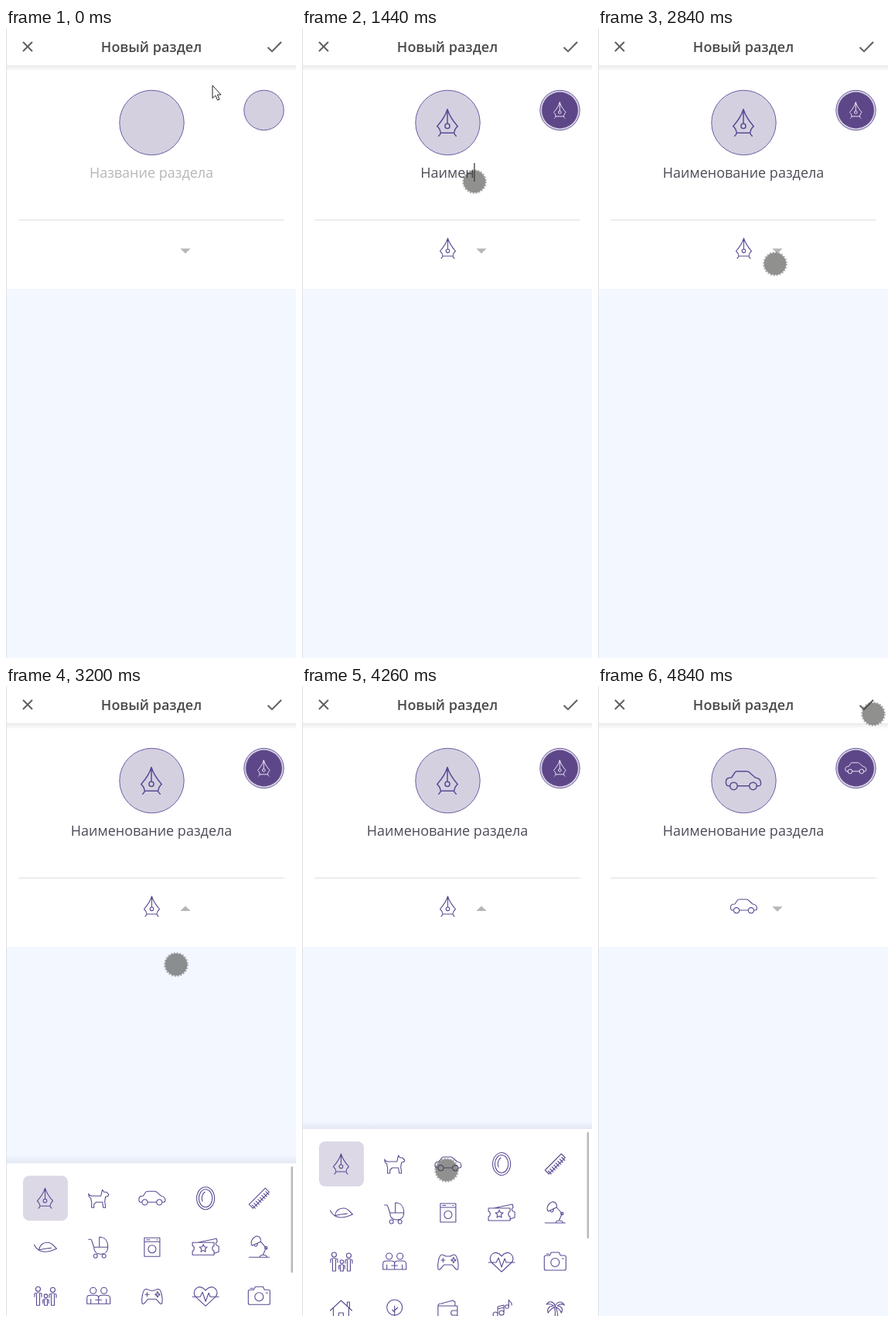
An HTML page that plays this animation: 375x812 px, repeating every 5.06 s.

```html
<!DOCTYPE html>
<html lang="ru">
<head>
<meta charset="utf-8">
<title>Новый раздел</title>
<style>
html, body { margin: 0; width: 100%; height: 100%; overflow: hidden; background: #fff; }
svg { display: block; width: 375px; height: 812px; }
text { font: 18px "Open Sans", "Noto Sans", sans-serif; text-anchor: middle; }
.icon { fill: none; stroke: #5b4a93; stroke-width: 1.1; stroke-linejoin: round; stroke-linecap: round; }
.icon path { vector-effect: non-scaling-stroke; }
</style>
</head>
<body>
<svg viewBox="0 0 375 812">
  <defs>
    <linearGradient id="down" x2="0" y2="1">
      <stop stop-color="#000" stop-opacity=".08"/><stop offset="1" stop-color="#000" stop-opacity="0"/>
    </linearGradient>
    <linearGradient id="up" x2="0" y1="1" y2="0">
      <stop stop-color="#203060" stop-opacity=".08"/><stop offset="1" stop-color="#203060" stop-opacity="0"/>
    </linearGradient>
  </defs>
  <rect width="375" height="812" fill="#fff"/>
  <rect y="336" width="375" height="476" fill="#f3f7ff"/>
  <rect y="48" width="375" height="8" fill="url(#down)"/>
  <text x="188" y="31" font-weight="600" style="font-weight:600" fill="#4a4a4a">Новый раздел</text>
  <path d="M22 18L34 30M34 18L22 30M338.5 25L344 30.2L356 18" fill="none" stroke="#606060" stroke-width="2"/>
  <path d="M16 247.5H360" stroke="#dedede"/>

  <circle cx="188.5" cy="122" r="41.7" fill="#d5d0e0" stroke="#6c5ca3"/>
  <circle cx="333.5" cy="106" r="25.7" fill="#d5d0e0" stroke="#6c5ca3"/>
  <g id="chosen">
    <circle cx="333.5" cy="106" r="23.4" fill="#5d4788"/>
    <g class="icon" transform="translate(188 122) scale(1.33)" style="stroke-width:1.5"><path/></g>
    <g class="icon" transform="translate(333.3 106) scale(.79)" style="stroke:#e9e5f1;stroke-width:1"><path/></g>
    <g class="icon" transform="translate(188.5 284)"><path/></g>
  </g>
  <text id="hint" x="188" y="193" fill="#b7b7b7">Название раздела</text>
  <text id="name" x="188" y="193" fill="#4d4b57" xml:space="preserve"></text>
  <rect id="caret" y="174" width="1.4" height="24" fill="#4a4a4a"/>
  <path id="arrow" fill="#b7b7b7"/>

  <g id="sheet">
    <rect y="561" width="375" height="10" fill="url(#up)"/>
    <rect y="571" width="375" height="241" fill="#fff"/>
    <rect x="22" y="587" width="58" height="58" rx="8" fill="#dcd8e6"/>
    <rect x="368.5" y="575" width="2.5" height="137" rx="1" fill="#b9b9b9"/>
    <g id="grid" class="icon"></g>
  </g>
  <path d="M.5 0V812" stroke="#dfe1e8"/>

  <path id="pointer" d="M267 74V90.5L270.8 87L273.6 93L276 92L273.4 86H278Z" fill="#fff" stroke="#222"/>
  <g id="touch" fill="#3c3e3a" fill-opacity=".57">
    <circle r="14.3"/>
    <circle r="15" fill="none" stroke="#3c3e3a" stroke-opacity=".42" stroke-width="1.6" stroke-dasharray="2.2 1.73"/>
  </g>
</svg>
<script>
const LOOP = 5060;
const $ = id => document.getElementById(id);
const ring = (x, y, rx, ry = rx) =>
  `M${x - rx} ${y}a${rx} ${ry} 0 1 0 ${2 * rx} 0a${rx} ${ry} 0 1 0 ${-2 * rx} 0`;

// Every icon is drawn around its own centre.
const pen = "M0-13C-2-6-6-1-10 3.5C-8 5-7 7-6.5 10H6.5C7 7 8 5 10 3.5C6-1 2-6 0-13V1" +
  "M-6.5 10C-6.5 11-7.5 12-8.5 13M6.5 10C6.5 11 7.5 12 8.5 13" + ring(0, 3.3, 2.3);
const car = "M-13 5H-15C-17 5-17 3-17 1C-17-2-15-3-11.5-3L-8.5-7.5C-8-9-7-9-5.5-9H3C5-9 6-8.3 7-7L11.5-3" +
  "C15-2.5 17-1 17 2.5C17 5 16 5 15 5H13M-5.7 5H5.7" + ring(-9.4, 5.2, 3.6) + ring(9.4, 5.2, 3.6);
const comb = "M-13 8L8-13L13-8L-8 13Z" +
  Array.from({ length: 8 }, (_, i) => `M${-9 + i * 2.5} ${9 - i * 2.5}l4 4`).join("");
const person = (x, y, r, h) => ring(x, y, r) +
  `M${x - r - 1.5} ${y + r + 7}V${y + r + 3}Q${x} ${y + r} ${x + r + 1.5} ${y + r + 3}v4M${x - 2} ${y + r + 3}V${h}H${x + 2}V${y + r + 3}`;

const icons = [
  pen,
  "M-13-6C-12-3-10-3-8-3H3L5-11L7-8H10L13-5C13-3 11-2 9-2L8 4L9 12H6L5 5H-3L-6 8V12H-9V6L-10 0C-12-1-13-3-13-6Z",
  car,
  ring(0, 0, 11.5, 14.5) + ring(0, 0, 8.7, 11.5) + "M-4 4C-6-1-4-6-1-8",
  comb,
  "M-14-3C-11 3-6 6 0 6C6 6 10 4 15 2C12 0 10-6 3-6C-3-6-7-2-8 4M-8 4C-3 2 3 2 8 1",
  "M-13-10H-10C-9-10-9-8-8-6L-6 0H12C12 6 8 9 3 9C-3 9-6 6-6 0M1 0V-13C8-13 12-8 12 0" + ring(-4, 11.5, 2.5) + ring(7, 11.5, 2.5),
  "M-10-12H10V12H-10ZM-10-7H10M-7-9.5H-3M6-9.5H7" + ring(0, 2.5, 5),
  "M-17-6H11V-2C8-1 8 4 11 5V10H-17V5C-14 4-14-1-17-2ZM-10-6L14-11L15-7C12-5 13-2 17-1L17 6L11 8" +
    "M-3-3.5L-1.6-.4L2 0L-.7 2.3L0 6L-3 4.2L-6 6L-5.3 2.3L-8 0L-4.4-.4Z",
  "M-13 13H13M1 13C1 9 10 9 10 13M5 10L9 1L2-7M-4-14C0-15 3-11 2-7L-9-2C-12-6-9-12-4-14ZM-6-3C-6 0-2 0-2-5" + ring(9, 1, 1.7),
  person(-9, -9, 3, 12) + person(10, -8, 3, 12) + person(1, 0, 2.3, 12),
  ring(-7, -7, 4) + ring(7, -7, 4) + "M-15 10V3C-15-1-13-1-10-1H-4C-1-1 0 0 0 3V10ZM0 3C0 0 1-1 4-1H10C13-1 15 0 15 3V10H0M-10 4V10M-4 5H4M10 4V10",
  "M-8-9C-5-9-4-7-2-7H2C4-7 5-9 8-9C12-9 14 4 13 9C11 13 8 6 5 4H-5C-8 6-11 13-13 9C-14 4-12-9-8-9ZM-9-2H-4M-6.5-4.5V.5" +
    ring(5, -2, 1) + ring(9, -2, 1) + ring(7, -4.5, .8) + ring(7, .5, .8),
  "M0 13L-13 1C-18-6-11-15-3-10L0-7L3-10C11-15 18-6 13 1ZM-17 1H-7L-4-5L0 7L4-4L6 1H17",
  "M-14-6Q-14-8-12-8H-7L-5-12H5L7-8H12Q14-8 14-6V9Q14 11 12 11H-12Q-14 11-14 9Z" + ring(0, 1, 5.5) + "M9-4H11M-11-10H-8",
  "M-14 0L0-13L14 0M-10-3V13H10V-3M-3 13V3H3V13M8-6V-11H11V-3",
  ring(0, -4, 10) + "M0-6V14M0 0L4-4M0 2L-3-1",
  "M-13-6V11H12V-6ZM-13-6C-13-9-11-9-9-9L6-13L9-11V-6M12 0H6C3 0 3 6 6 6H12",
  ring(-8, 5, 3) + ring(0, 3, 3) + "M-5 5V-5L3-7V3M-5-2L3-4" + ring(7, -5, 2.3) + "M9.3-5V-14C10-11 14-11 13-7",
  "M0-6C-2-12-8-13-11-8C-8-9-5-9-2-6C-8-6-11-2-9 3C-7-1-4-3 0-5C4-3 7-1 8 3C11-2 8-6 3-6C6-9 9-9 12-7C9-13 3-12 0-6M-1-4C1 2 0 8-2 13H3C4 7 3 1 1-4"
];
$("grid").innerHTML = icons.map((d, i) =>
  `<path d="${d}" transform="translate(${50.5 + i % 5 * 69.2} ${616 + Math.floor(i / 5) * 63})"/>`).join("");

const ease = {
  flow: k => k * k * (3 - 2 * k),
  in: k => k ** 1.7,
  out: k => 1 - (1 - k) ** 1.7
};

// time, x, y, easing into this stop
const route = [
  [180, 271, 84], [480, 223, 198], [2460, 223, 198], [2820, 229, 304],
  [3080, 229, 304], [3540, 175, 629], [3580, 172, 629], [3800, 280, 627],
  [4040, 185, 625], [4160, 185, 625], [4260, 187, 624], [4380, 187, 624],
  [4690, 337, 153, "in"], [4840, 356, 36, "out"]
];
function touchAt(t) {
  const i = route.findIndex(s => s[0] > t);
  if (i < 0) return route[route.length - 1].slice(1, 3);
  if (i === 0) return route[0].slice(1, 3);
  const [t0, x0, y0] = route[i - 1], [t1, x1, y1, e = "flow"] = route[i];
  const k = ease[e]((t - t0) / (t1 - t0));
  return [x0 + (x1 - x0) * k, y0 + (y1 - y0) * k];
}

const phrase = "Наименование раздела";
const lastKeys = [2060, 2080, 2160, 2200, 2240, 2260, 2300];
const keyTime = i => i < 6 ? 920 + i * 104 : i < 13 ? 1480 + (i - 6) * 86 : lastKeys[i - 13];
const between = (t, a, b) => t >= a && t < b;
const ramp = (t, a, b) => ease.flow(Math.min(1, Math.max(0, (t - a) / (b - a))));
const show = (id, on) => $(id).setAttribute("visibility", on ? "visible" : "hidden");
const chosen = $("chosen").querySelectorAll("path");

function draw(t) {
  show("pointer", t < 200);
  show("touch", t >= 200);
  show("chosen", t >= 200);
  show("hint", t < 480);
  $("touch").setAttribute("transform", `translate(${touchAt(t).map(Math.round).join(" ")})`);

  const typed = [...phrase].filter((_, i) => t >= keyTime(i)).join("");
  const name = $("name");
  if (name.textContent !== typed) name.textContent = typed;
  $("caret").setAttribute("x", 188 + (typed ? name.getComputedTextLength() / 2 - .5 : .3));
  show("caret", between(t, 480, 620) || between(t, 780, 2460) || between(t, 2620, 2780));

  const icon = t < 4360 ? pen : car;
  chosen.forEach(p => p.setAttribute("d", icon));
  $("arrow").setAttribute("d", between(t, 3000, 4360) ? "M225.3 290H238.7L232 283.5Z" : "M225.3 284.2H238.7L232 290.7Z");

  const open = ramp(t, 2980, 3280) - ramp(t, 4340, 4620);
  show("sheet", open > 0);
  $("sheet").setAttribute("transform", `translate(0 ${252 * (1 - open)})`);
}

const start = performance.now();
function tick() {
  const t = (performance.now() - start) % LOOP;
  draw(Math.floor(t / 20) * 20);
  requestAnimationFrame(tick);
}
tick();
</script>
</body>
</html>
```
